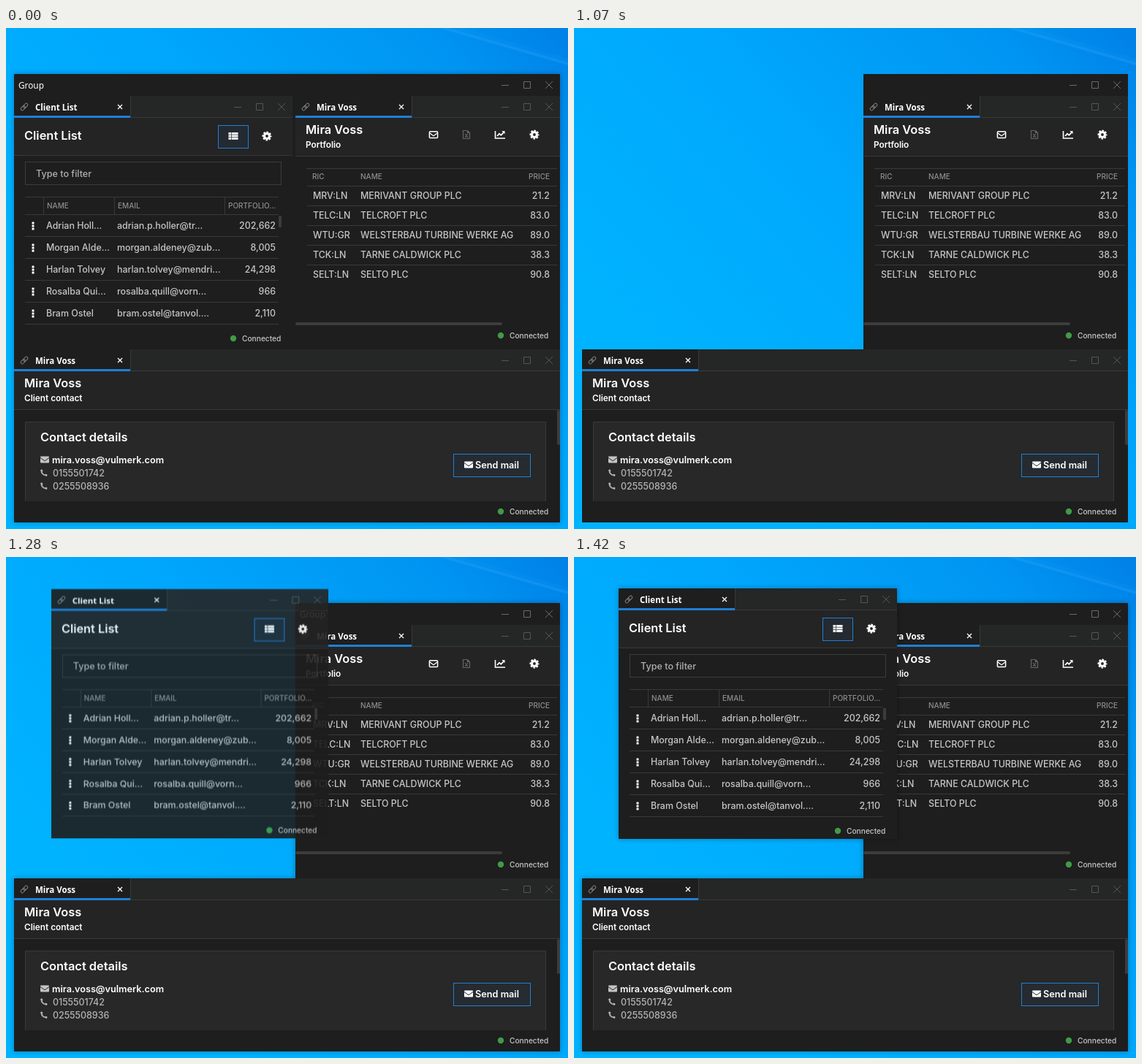
An HTML page that plays this animation: 769x686 px, repeating every 2.89 s.

```html
<!DOCTYPE html>
<html lang="en">
<head>
<meta charset="utf-8">
<title>Window group</title>
<style>
  html, body { margin: 0; width: 100%; height: 100%; overflow: hidden; background: #00a8fb; }
  svg { display: block; width: 769px; height: 686px; }
  text { font-family: Montserrat, Inter, sans-serif; font-weight: 500; white-space: pre; }
  .ui, .tab { font: 400 11.8px "Segoe UI", "Open Sans", "Noto Sans", sans-serif; fill: #fff; }
  .tab { font-size: 11.5px; font-weight: 600; }
  .h1 { font-size: 16.4px; font-weight: 600; fill: #fff; }
  .h2 { font-size: 11.8px; font-weight: 600; fill: #fff; }
  .th { font-size: 10px; fill: #8e8e8e; }
  .td { font-size: 12.4px; fill: #c6c6c6; }
  .strong { font-size: 12.7px; font-weight: 600; fill: #fff; }
  .hint { font-size: 12.6px; fill: #b0b0b0; }
  .tel { font-size: 12.4px; fill: #b4b4b4; }
  .note { font-size: 10.2px; fill: #c8c8c8; }
  #list { transform-origin: 201.5px 264.5px; }
</style>
</head>
<body>
<svg id="stage" viewBox="0 0 769 686" xmlns="http://www.w3.org/2000/svg"></svg>
<script>
const LOOP = 2890;
const DARK = '#1e1e1e', BAR = '#252626', HEAD = '#242424', EDGE = '#393939', BLUE = '#1f7fd6';

const rect = (x, y, w, h, fill, more = '') =>
  `<rect x="${x}" y="${y}" width="${w}" height="${h}" fill="${fill}" ${more}/>`;
const box = (x, y, w, h, fill, stroke) =>
  rect(x + .5, y + .5, w - 1, h - 1, fill, `stroke="${stroke}"`);
const hline = (x1, x2, y) => rect(x1, y, x2 - x1, 1, EDGE);
const vline = (x, y1, y2) => rect(x, y1, 1, y2 - y1, EDGE);
const text = (cls, x, y, s, anchor = 'start') =>
  `<text class="${cls}" x="${x}" y="${y}" text-anchor="${anchor}">${s}</text>`;
const path = (d, stroke, width = 1, fill = 'none') =>
  `<path d="${d}" stroke="${stroke}" stroke-width="${width}" fill="${fill}"/>`;
const at = (x, y, s, more = '') => `<g transform="translate(${x} ${y}) ${more}">${s}</g>`;
const group = (id, s) => `<g id="${id}">${s}</g>`;

// Icons, each centred on x, y
const link = (x, y) => at(x, y,
  '<g fill="none" stroke="#858585"><rect x="-6" y="-2" width="7" height="4" rx="2"/>' +
  '<rect x="-1" y="-2" width="7" height="4" rx="2"/></g>', 'rotate(-45)');
const gear = (x, y) => at(x, y,
  '<g fill="none" stroke="#fff"><circle r="3.5" stroke-width="3.2"/>' +
  '<circle r="5.5" stroke-width="2" stroke-dasharray="2.6 1.72" stroke-dashoffset="1.3"/></g>');
const mail = (x, y, fill) => at(x, y,
  rect(-6, -4.5, 12, 9, fill, 'rx="1"') + path('M-6-2.5L0 1.8 6-2.5', '#282828', 1));
const mailOutline = (x, y) => at(x, y,
  '<rect x="-5.6" y="-4.3" width="11.2" height="8.8" rx="1" fill="none" stroke="#fff" stroke-width="1.5"/>' +
  path('M-5-2L0 1.7 5-2', '#fff', 1.3));
const sheet = (x, y) => at(x, y,
  path('M-4.5-5.5H1.5L4.5-2.5V5.5H-4.5ZM1.5-5.5V-2.5H4.5M-2-1L2 4M2-1L-2 4', '#666', 1.2));
const chart = (x, y) => at(x, y,
  path('M-6.5-5V5H7', '#fff', 1.6) + path('M-4 2L-1-1.3 1.3.8 5-3.2', '#fff', 1.8) +
  path('M2.3-5H6.5V-.8Z', 'none', 0, '#fff'));
const phone = (x, y) => at(x, y,
  path('M-3.6-3.6C-3.8.8-.8 3.8 3.6 3.6', '#b4b4b4', 1.8) +
  path('M-3.8-4.2L-2.6-1.6M4.2 3.8L1.6 2.6', '#b4b4b4', 2.5));
const rowsIcon = (x, y) => at(x, y, [-5, -1.5, 2].map(v =>
  rect(-6.5, v, 3.6, 2.8, '#fff') + rect(-2.2, v, 8.7, 2.8, '#fff')).join(''));
const dots = (x, y) => [-5.5, -1.5, 2.5].map(v => rect(x - 1.5, y + v, 3, 3, '#fff', 'rx=".6"')).join('');

// Minimise, maximise, close; x is the centre of the last one
const controls = (x, y, color) =>
  path(`M${x - 65} ${y + .5}h10M${x - 34.5} ${y - 4.5}h9v9h-9zM${x - 5} ${y - 5}l10 10m0-10l-10 10`, color);
const status = (x, y) =>
  `<circle cx="${x}" cy="${y}" r="4.2" fill="#419a48"/>` + text('note', x + 12, y + 3.5, 'Connected');
const tabBar = (x, y, right, title, ctl) =>
  rect(x, y, right - x, 30, BAR) + rect(x, y, 159, 30, DARK) + vline(x + 159, y, y + 30) +
  hline(x + 159, right, y + 29) + rect(x, y + 27, 159, 3, BLUE) +
  link(x + 14, y + 15) + text('tab', x + 29, y + 20, title) +
  path(`M${x + 142} ${y + 12}l6 6m0-6l-6 6`, '#fff', 1.3) + controls(ctl, y + 15, '#555');
const header = (x, y, right, h) => rect(x, y, right - x, h, HEAD) + hline(x, right, y + h - 1);

const clients = [
  ['Adrian Holl...', 'adrian.p.holler@tr...', '202,662'],
  ['Morgan Alde...', 'morgan.aldeney@zub...', '8,005'],
  ['Harlan Tolvey', 'harlan.tolvey@mendri...', '24,298'],
  ['Rosalba Qui...', 'rosalba.quill@vorn...', '966'],
  ['Bram Ostel', 'bram.ostel@tanvol....', '2,110'],
];
const stocks = [
  ['MRV:LN', 'MERIVANT GROUP PLC', '21.2'],
  ['TELC:LN', 'TELCROFT PLC', '83.0'],
  ['WTU:GR', 'WELSTERBAU TURBINE WERKE AG', '89.0'],
  ['TCK:LN', 'TARNE CALDWICK PLC', '38.3'],
  ['SELT:LN', 'SELTO PLC', '90.8'],
];
const person = 'Mira Voss';

const desktop = `
  <defs>
    <linearGradient id="sky" gradientUnits="userSpaceOnUse" x1="130" y1="480" x2="720" y2="-60">
      <stop offset="0" stop-color="#00b3ff"/><stop offset=".45" stop-color="#00a7fc"/>
      <stop offset=".8" stop-color="#0095f2"/><stop offset="1" stop-color="#0080e7"/>
    </linearGradient>
    <filter id="soft" x="-10%" y="-10%" width="120%" height="120%"><feGaussianBlur stdDeviation="3.5"/></filter>
    <filter id="haze"><feGaussianBlur stdDeviation=".8"/></filter>
  </defs>` + rect(0, 0, 769, 686, 'url(#sky)') +
  '<path d="M590-3L775 51V44L618-3Z" fill="#35a8ff" opacity=".08"/>' +
  '<path d="M588-3L775 51" stroke="#45b4ff" stroke-width="1.6" opacity=".45" filter="url(#haze)"/>';

const shadow = (id, d) =>
  `<path id="${id}" d="${d}" filter="url(#soft)" fill="#000" fill-opacity=".3"/>`;

const wholeFrame = shadow('shade', 'M11 63H758V677H11Z') +
  rect(11, 63, 386, 378, DARK) + text('ui', 17, 83, 'Group');

const portfolio =
  rect(396, 63, 362, 377, DARK) + controls(743, 78, '#6a6a6a') +
  tabBar(396, 93, 758, person, 743) + header(396, 123, 758, 53) +
  text('h1', 410, 145, person) + text('h2', 410, 164, 'Portfolio') +
  mailOutline(585, 146) + sheet(630, 146) + chart(676, 146) + gear(723, 146) +
  text('th', 419, 207, 'RIC') + text('th', 485, 207, 'NAME') + text('th', 744, 207, 'PRICE', 'end') +
  hline(411, 754, 192) +
  stocks.map(([ric, name, price], i) => {
    const y = 216 + i * 27;
    return hline(412, 754, y) + text('td', 420, y + 18, ric) +
      text('td', 485, y + 18, name) + text('td', 744, y + 18, price, 'end');
  }).join('') +
  rect(396, 403, 283, 4, '#3c3c3c', 'rx="2"') + status(677, 421);

const contact =
  rect(11, 440, 747, 237, DARK) + tabBar(11, 440, 758, person, 743) + header(11, 470, 758, 53) +
  text('h1', 25, 492, person) + text('h2', 25, 511, 'Client contact') +
  rect(26, 539, 713, 109, '#282828') + hline(26, 739, 539) + vline(26, 539, 648) + vline(738, 539, 648) +
  text('h1', 47, 566, 'Contact details') +
  mail(53, 591, '#c4c4c4') + text('strong', 63, 596, 'mira.voss@vulmerk.com') +
  phone(52, 609) + text('tel', 64, 614, '0155501742') +
  phone(52, 627) + text('tel', 64, 632, '0255508936') +
  box(612, 583, 106, 32, '#252b31', BLUE) + mail(633, 598, '#fff') + text('strong', 642, 603, 'Send mail') +
  rect(754, 523, 4, 48, '#3c3c3c', 'rx="2"') + status(677, 662);

const clientList =
  shadow('listShade', 'M11 93H392V436H11Z') + rect(11, 93, 381, 343, DARK) +
  tabBar(11, 93, 392, 'Client List', 377) + header(11, 123, 392, 52) +
  text('h1', 25, 153, 'Client List') +
  box(290, 133, 42, 32, '#232a31', BLUE) + rowsIcon(311, 148) + gear(357, 148) +
  box(26, 183, 351, 32, DARK, '#3c3c3c') + text('hint', 41, 204, 'Type to filter') +
  hline(26, 373, 231) + [51, 148, 299].map(x => vline(x, 231, 255)).join('') +
  text('th', 56, 247, 'NAME') + text('th', 153, 247, 'EMAIL') + text('th', 304, 247, 'PORTFOLIO...') +
  hline(26, 373, 255) +
  clients.map(([name, email, value], i) => {
    const y = 275 + i * 30;
    return dots(37, y - 4) + text('td', 55, y, name) + text('td', 152, y, email) +
      text('td', 369, y, value, 'end') + hline(26, 373, y + 10);
  }).join('') +
  rect(373, 257, 4, 16, '#3c3c3c', 'rx="1"') + status(311, 425);

document.getElementById('stage').innerHTML = desktop +
  group('whole', wholeFrame) +
  shadow('cutShade', 'M396 63H758V677H11V440H396Z') +
  portfolio + group('cutTitle', text('ui', 402, 83, 'Group')) + contact +
  group('list', clientList);

// Hold each pose from its time until the next one
function hold(id, poses) {
  const frames = poses.map(([ms, pose]) => ({ ...pose, offset: ms / LOOP, easing: 'steps(1, end)' }));
  frames.push({ ...poses[poses.length - 1][1], offset: 1 });
  document.getElementById(id).animate(frames, { duration: LOOP, iterations: Infinity });
}
const on = { opacity: 1 }, off = { opacity: 0 };
const floating = (opacity, scale) => ({ opacity, transform: `translate(50px, -50px) scale(${scale})` });

hold('whole', [[0, on], [1000, off]]);
hold('cutShade', [[0, off], [1140, on]]);
hold('cutTitle', [[0, off], [1140, on]]);
hold('listShade', [[0, off], [1420, on]]);
hold('list', [
  [0, { opacity: 1, transform: 'translate(0px, 0px) scale(1)' }],
  [1000, floating(0, .985)],
  [1210, floating(.78, .9895)],
  [1280, floating(.915, .9948)],
  [1350, floating(.97, .998)],
  [1420, floating(1, 1)],
]);
</script>
</body>
</html>
```
